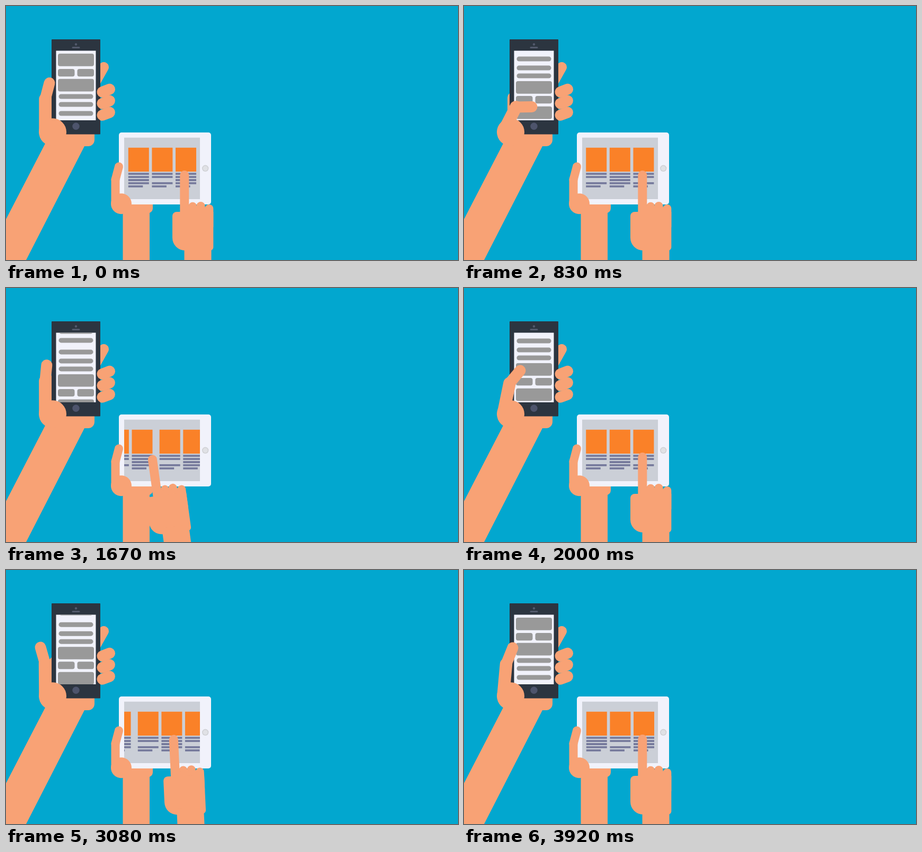
Write an HTML page with a canvas that moves like this. It is 853 px wide and 480 px high and loops after 4.01 s.

```html
<!DOCTYPE html>
<html lang="en">
<head>
<meta charset="utf-8">
<title>Swiping phone and tablet</title>
<style>
  html, body { margin: 0; width: 100%; height: 100%; overflow: hidden; background: #02a7cf; }
  canvas { display: block; }
</style>
</head>
<body>
<canvas id="stage" width="853" height="480"></canvas>
<script>
const ctx = document.getElementById('stage').getContext('2d');
const SKIN = '#f8a275', PALE = '#f1f2fb';
const LOOP = 4010, STEP = 1000 / 12;
const SWIPE = 7.8;   // steps from one swipe to the next
const SETTLE = 4.7;  // steps until the pages rest

// Thumb poses from stretched out to fully bent: joint x, y, tip x, y
const THUMB = [
  [73.5, 176, 65, 146],
  [74, 176, 82, 145.5],
  [79.5, 178, 92, 147],
  [86, 180, 106, 156],
  [98, 191, 128, 190.5]
];
// Swipe phase and pose index
const THUMB_KEYS = [[0, 4], [2.3, 0], [4.8, 0], [5.3, 1], [5.5, 2], [5.9, 3], [7, 4], [SWIPE, 4]];

const mix = (a, b, k) => a + (b - a) * k;
const clamp = k => Math.max(0, Math.min(1, k));
const ease = k => (1 - Math.cos(Math.PI * clamp(k))) / 2;

function box(x, y, w, h, r, color) {
  ctx.fillStyle = color;
  ctx.beginPath();
  ctx.roundRect(x, y, w, h, r);
  ctx.fill();
}

function disc(x, y, r, color) {
  ctx.fillStyle = color;
  ctx.beginPath();
  ctx.arc(x, y, r, 0, 2 * Math.PI);
  ctx.fill();
}

function limb(x1, y1, x2, y2, width) {
  ctx.strokeStyle = SKIN;
  ctx.lineWidth = width;
  ctx.lineCap = 'round';
  ctx.beginPath();
  ctx.moveTo(x1, y1);
  ctx.lineTo(x2, y2);
  ctx.stroke();
}

function clipped(x, y, w, h, draw) {
  ctx.save();
  ctx.beginPath();
  ctx.rect(x, y, w, h);
  ctx.clip();
  draw();
  ctx.restore();
}

function phonePage(odd, dy) {
  const block = y => box(98, y + dy, 68, 23.7, 4, '#999');
  const bar = y => box(99.5, y - 4.5 + dy, 65, 9, 4.5, '#999');
  const top = odd ? 142 : 90;
  block(top);
  for (const x of [98, 134.5]) box(x, top + (odd ? 28 : 29) + dy, 31.5, 14.2, 4, '#999');
  block(top + 47.7);
  (odd ? [100, 117, 132] : [171, 186, 203]).forEach(bar);
}

function tabletPage(odd, dx) {
  for (let i = 0; i < 3; i++) {
    const x = (odd ? 230.2 : 230.8) + i * 44.6 + dx;
    box(x, 267.7, 39, 45.3, 0, '#fa8128');
    for (let row = 0; row < 5; row++) {
      if (row === 2 && i % 2 === (odd ? 0 : 1)) continue;
      box(x, 315.3 + row * 5.9, row === 4 ? 27.5 : 39, 3.8, 0, '#767a9c');
    }
  }
}

function thumbPose(phase) {
  const i = THUMB_KEYS.findIndex(key => phase < key[0]);
  const [t0, p0] = THUMB_KEYS[i - 1], [t1, p1] = THUMB_KEYS[i];
  const pose = mix(p0, p1, (phase - t0) / (t1 - t0));
  const low = Math.min(3, Math.floor(pose));
  return THUMB[low].map((v, k) => mix(v, THUMB[low + 1][k], pose - low));
}

function drawPhone(odd, left, phase) {
  // arm, palm and fingers behind the phone
  ctx.fillStyle = SKIN;
  ctx.beginPath();
  for (const [x, y] of [[76, 256], [148.5, 264], [38, 480], [0, 480], [0, 403]]) ctx.lineTo(x, y);
  ctx.fill();
  box(84, 225, 83, 40, [0, 0, 12, 0], SKIN);
  limb(92, 173, 92, 235, 20);
  limb(184.5, 115.5, 168, 145, 19);

  box(86, 63, 92, 179.5, 1, '#2c3540');
  disc(132, 72.5, 2.2, '#535a6c');
  box(124.5, 77, 15, 3, 1.5, '#535a6c');
  disc(132, 227.3, 6.7, '#4d546c');
  box(94.5, 84.5, 75, 131.5, 0, PALE);
  clipped(94.5, 84.5, 75, 131.5, () => {
    const gap = odd ? 125 : 135;
    const shift = (odd ? 86 : 86) * Math.pow(left, 2.73) ;
    phonePage(odd, shift);
    phonePage(!odd, shift - gap);
  });

  for (const y of [162.5, 184.3, 206.3]) limb(182, y, 195.5, y - 5.2, 21);
  const [jx, jy, tx, ty] = thumbPose(phase);
  limb(74, 238, jx, jy, 23.5);
  limb(jx, jy, tx, ty, 21);
  disc(88, 238.3, 26, SKIN);
}

function drawTablet(odd, left) {
  box(213, 360, 64, 31.5, [0, 0, 9, 0], SKIN);
  box(220.5, 380, 50.5, 100, 0, SKIN);

  box(213, 239, 174, 136, 5, PALE);
  box(223, 248.8, 143, 116.2, 0, '#cbcfd7');
  disc(376.2, 306.8, 6.2, '#d0d1d5');
  disc(376.2, 306.8, 4.6, '#e0e1e5');
  clipped(223, 248.8, 143, 116.2, () => {
    const gap = odd ? 142 : 144;
    const shift = gap * Math.pow(left, 1.68);
    tabletPage(odd, shift);
    tabletPage(!odd, shift - gap);
  });

  limb(206.5, 374, 206.5, 328, 16);
  limb(206.5, 328, 213, 303.5, 16);
  disc(217.5, 373.7, 19.5, SKIN);
}

function drawPointer(phase) {
  const swing = 9.1 * (phase < 2.6 ? ease(phase / 2.5) : 1 - ease((phase - 2.6) / 1.1));
  ctx.save();
  ctx.translate(340, 761);
  ctx.rotate(-swing * Math.PI / 180);
  ctx.translate(-340, -761);
  box(328.3, 311, 17, 100, 8.5, SKIN);
  box(344.5, 370.7, 15.5, 50, 7.7, SKIN);
  box(359.5, 370, 16, 50, 8, SKIN);
  box(375.5, 375, 15.8, 50, 7.9, SKIN);
  box(344, 380, 38, 30, 0, SKIN);
  box(314, 389, 77.3, 73, [8, 0, 6, 24], SKIN);
  box(336.5, 450, 51, 70, 0, SKIN);
  ctx.restore();
}

function draw(now) {
  const step = Math.floor((now % LOOP + 4) / STEP);
  const s = Math.min(step, 47) + 5.3;
  const phase = s % SWIPE;
  const odd = Math.floor(s / SWIPE) % 2 === 1;
  const left = 1 - clamp(phase / SETTLE);

  box(0, 0, 853, 480, 0, '#02a7cf');
  drawPhone(odd, left, phase);
  drawTablet(odd, left);
  drawPointer(phase);
}

const start = performance.now();
function tick() {
  draw(performance.now() - start);
  requestAnimationFrame(tick);
}
tick();
</script>
</body>
</html>
```
